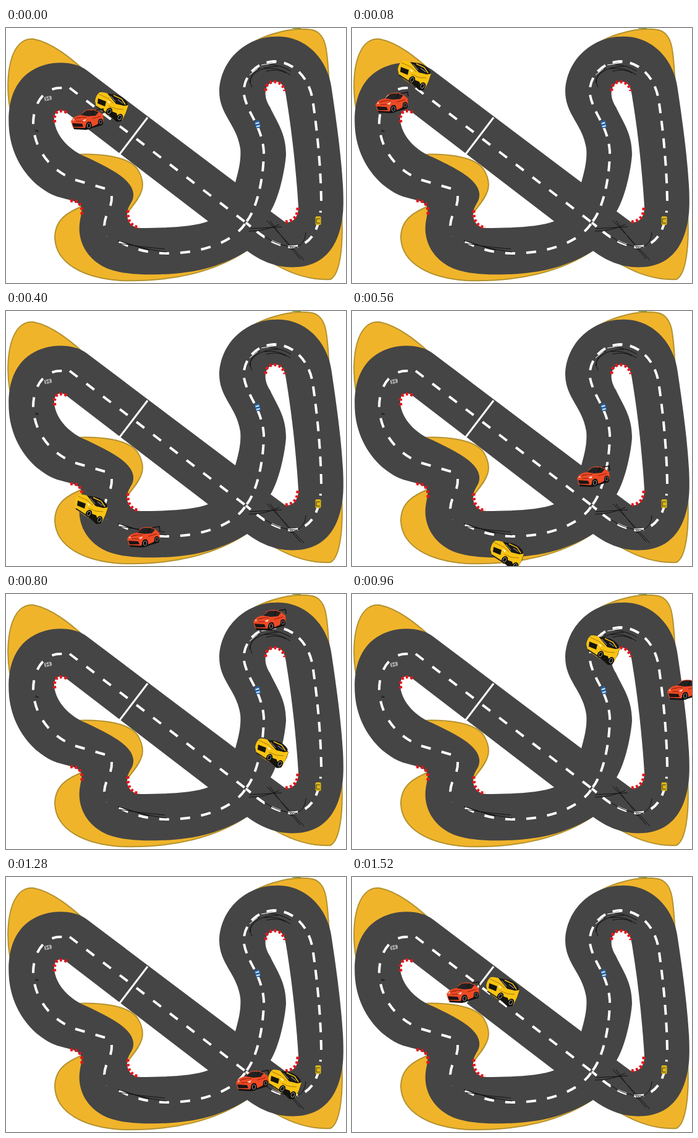
Animation, 550 px wide and 413 px high, one loop 1.6 s. Source, as an HTML page:

```html
<!DOCTYPE html>
<html lang="en">
<head>
<meta charset="utf-8">
<title>Race track</title>
<style>
  html, body { margin: 0; height: 100%; overflow: hidden; background: #fff; }
  svg { display: block; width: 550px; height: 413px; }
  .sand { fill: #f0b42b; stroke: #b3922e; stroke-width: 2; }
  .road { fill: #454545; fill-rule: evenodd; }
  .line { fill: none; stroke: #fff; stroke-width: 4; stroke-dasharray: 16 18; }
  .kerb { fill: none; stroke: #e3151b; stroke-width: 5; stroke-dasharray: 4 3.6; }
  .skid { fill: none; stroke: #111; stroke-width: 1; }
</style>
</head>
<body>
<svg viewBox="0 0 550 413">
  <g class="sand">
    <path d="M6 128C-2 80 6 14 45 18C75 24 105 49 126 68L60 120Z"/>
    <path d="M112 205C150 203 198 207 213 229C233 262 211 278 193 304L150 260Z"/>
    <path d="M125 288C100 298 79 310 79 340C81 383 128 405 185 409C270 412 340 394 390 360L200 340Z"/>
    <path d="M373 44C400 14 458-3 495 3C522 9 519 46 523 90L450 60Z"/>
    <path d="M543 300C546 355 540 399 525 407C490 409 455 396 424 376L500 330Z"/>
    <path d="M463 0h14" stroke="#6f9a35"/>
  </g>

  <path class="road" d="M371 250L130 68C112 54 70 50 40 70C8 91 2 130 5 165C9 211 37 252 75 270C95 279 116 277 122 291
    C124 300 117 313 119 332C122 358 139 379 165 390C190 399 220 400 250 399C305 398 352 385 390 361
    C413 378 440 390 473 387C518 383 540 350 545 300C549 253 536 160 527 100C521 48 482 11 435 14
    C395 14 349 45 345 100C344 140 373 155 379 195C381 215 375 235 371 250Z
    M99 138L327 313C304 322 260 324 217 324C200 322 195 310 196 298C199 284 207 282 206 268C203 245 172 229 130 209
    C104 199 81 176 78 150C77 134 88 129 99 138Z
    M435 87C446 87 451 95 453 110C462 165 469 225 473 290C473 308 462 317 451 314L428 297C442 273 451 232 453 205
    C453 170 438 152 427 128C414 108 419 88 435 87Z"/>

  <g class="line">
    <path d="M103 97L388 315"/>
    <path d="M510 280C509 225 504 170 496 116C490 80 465 54 433 54C400 56 382 84 385 108C391 140 414 158 417 200
      C417 240 407 292 388 315" stroke-dasharray="16 12.5"/>
    <path d="M388 315C407 331 430 352 462 355C490 353 505 332 509 296" stroke-dasharray="16 12.5" stroke-dashoffset="5.5"/>
    <path d="M160 260L112 246C72 231 47 198 44 158C43 126 59 97 88 97L103 97"/>
    <path d="M171 272C172 292 160 300 159 320L162 338"/>
    <path d="M183 346C205 358 230 365 265 365C315 364 368 348 388 315"/>
    <path d="M229 145L184 204" stroke-width="3" stroke-dasharray="none"/>
  </g>

  <g class="kerb">
    <path d="M79 153C76 137 84 130 99 137"/>
    <path d="M104 280C118 278 126 290 122 305"/>
    <path d="M197 295C196 311 202 322 216 323"/>
    <path d="M420 102C418 84 446 80 451 102"/>
    <path d="M472 291C472 305 465 313 452 314"/>
  </g>

  <g class="skid">
    <path d="M181 344Q215 357 259 363M184 349Q220 355 257 358M190 347L232 360"/>
    <path d="M398 96Q390 82 404 72T440 62M394 89Q395 74 411 65M418 66Q440 62 460 76M421 70Q440 65 453 73M425 59Q445 60 461 70"/>
    <path d="M394 325L446 322M393 329Q420 329 442 318M422 312Q450 341 482 376M427 312Q448 342 476 374M418 337Q440 354 471 355M460 359Q484 353 485 331"/>
    <path d="M48 164l4 4m-5-1h6"/>
    <path d="M394 76L407 66M413 60L437 56M456 353h16" stroke="#fff"/>
  </g>

  <!-- small parked cars -->
  <g transform="translate(68 114) rotate(-12)">
    <rect x="-6" y="-3.5" width="12" height="7" rx="2" fill="#aaa"/>
    <path d="M-3-3v6M2-3v6M-3 0h5" stroke="#333"/>
  </g>
  <g transform="translate(407 156) rotate(-15)">
    <rect x="-4" y="-6" width="8" height="12" rx="2" fill="#2465a8"/>
    <path d="M-3-2h6M-3 3h6" stroke="#e8f2fa" stroke-width="2"/>
  </g>
  <g transform="translate(505 312)">
    <rect x="-4.5" y="-7" width="9" height="14" rx="2" fill="#d9b51c"/>
    <path d="M-3-3h6M-3 4h6M-3-3v7" stroke="#4a3d08" fill="none"/>
  </g>

  <defs>
    <g id="wheel">
      <ellipse rx="4.8" ry="6.2" fill="#0c0c0c"/>
      <ellipse rx="2.6" ry="3.8" fill="none" stroke="#aaa" stroke-width=".9"/>
    </g>
  </defs>

  <g id="yellow">
    <path d="M2 25L11 32L24 40L35 50L42 49L51 34L54 24L46 13L30 7L14 13Z" fill="#15130c"/>
    <path d="M0 16Q2 5 8 2Q18 1 27 8L34 20L47 24L54 23L50 35L44 47L38 47L35 36L27 33L22 40L10 32L2 25Z" fill="#f8c312"/>
    <path d="M20 4L34 6Q47 9 53 20L47 24L34 21Z" fill="#191919"/>
    <path d="M30 7L43 13L49 22" fill="none" stroke="#f8c312" stroke-width="1.5"/>
    <path d="M25 8L33 17M37 14L45 20" stroke="#ddd" stroke-width=".8"/>
    <path d="M5 12L18 17L16 25L4 20Z" fill="#17150c"/>
    <path d="M6 5L21 12L30 20M22 24L34 29L46 30" fill="none" stroke="#a87808"/>
    <path d="M19 15l6 3-2 3z" fill="#fff4b8"/>
    <path d="M2 25L19 36" stroke="#222" stroke-width="2"/>
    <use href="#wheel" transform="translate(23 33) rotate(30)"/>
    <use href="#wheel" transform="translate(40 43) rotate(30)"/>
  </g>

  <g id="red">
    <path d="M2 27L5 35L25 36L51 28L53 20L45 9L20 8Z" fill="#151111"/>
    <path d="M0 22Q4 13 16 12L22 5Q34 0 45 6L52 12L53 23L46 21L43 27L34 31L32 23L26 24L23 33L3 32Z" fill="#ed4a26"/>
    <path d="M16 12L24 5Q35 2 45 7L40 13L28 14Z" fill="#222"/>
    <path d="M41 4L52 2L53 9M37 4L34 12" fill="none" stroke="#151515" stroke-width="1.6"/>
    <path d="M2 25L18 26L20 31L4 31Z" fill="#1c1515"/>
    <path d="M4 20Q14 14 25 16M8 22L19 22M34 18L48 14M10 16l5 1" fill="none" stroke="#8e1d0c"/>
    <path d="M18 21l7-3-2 4zM2 20l4-2-1 3z" fill="#ffe3d0"/>
    <use href="#wheel" transform="translate(29 29) rotate(8)"/>
    <use href="#wheel" transform="translate(48 23) scale(.85)"/>
  </g>
</svg>
<script>
  const STEP = 80, STEPS = 20;

  // Key points of each lap: step, then the car's top-left corner
  const laps = {
    red: [[0, 105, 129], [1, 38, 102], [3, 135, 228], [5, 196, 347], [7, 364, 249],
          [10, 400, 23], [12, 510, 136], [14, 498, 312], [16, 372, 311], [19, 153, 168]],
    yellow: [[0, 144, 102], [1, 74, 51], [3, 0, 176], [5, 111, 295], [7, 224, 370],
             [10, 403, 232], [12, 379, 65], [14, 480, 116], [16, 424, 310], [19, 217, 160]]
  };

  // Smooth closed curve through the key points
  function position(keys, step) {
    const n = keys.length;
    const key = i => {
      const [s, x, y] = keys[(i + n) % n];
      return [s + STEPS * Math.floor(i / n), x, y];
    };
    const i = keys.findLastIndex(([s]) => s <= step);
    const [a, b, c, d] = [i - 1, i, i + 1, i + 2].map(key);
    const span = c[0] - b[0], u = (step - b[0]) / span;
    return [1, 2].map(axis => {
      const slopeB = (c[axis] - a[axis]) / (c[0] - a[0]) * span;
      const slopeC = (d[axis] - b[axis]) / (d[0] - b[0]) * span;
      return b[axis] + (c[axis] - b[axis]) * u * u * (3 - 2 * u)
        + u * (1 - u) * (slopeB * (1 - u) - slopeC * u);
    });
  }

  function draw(now) {
    const step = Math.floor(now / STEP) % STEPS;
    for (const [id, keys] of Object.entries(laps))
      document.getElementById(id).setAttribute("transform", `translate(${position(keys, step)})`);
    requestAnimationFrame(draw);
  }
  draw(performance.now());
</script>
</body>
</html>
```
